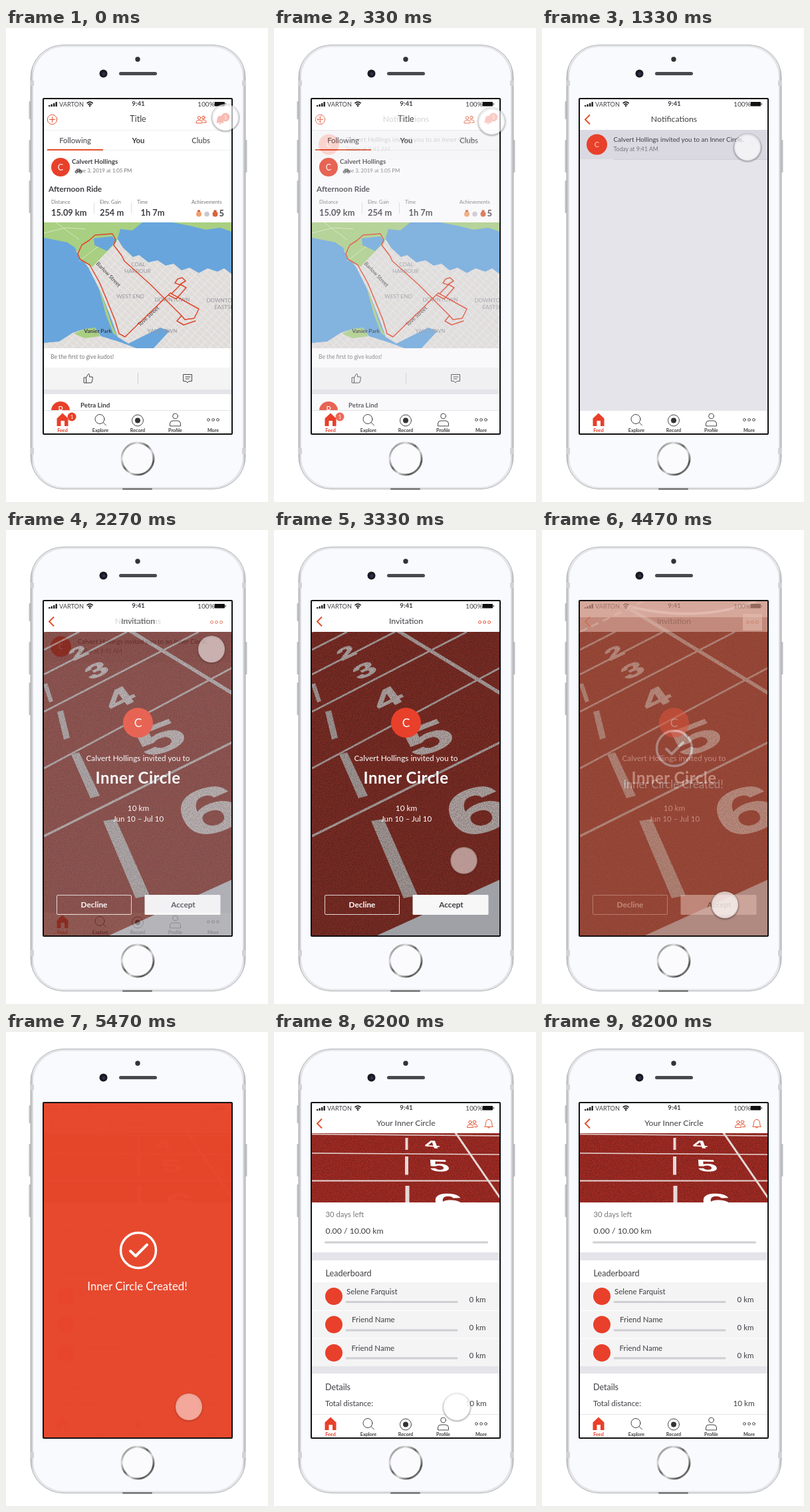
An HTML page that plays this animation: 394x712 px, repeating every 8.54 s.

```html
<!DOCTYPE html>
<html lang="en">
<head>
<meta charset="utf-8">
<title>Inner Circle prototype</title>
<style>
html, body { margin: 0; width: 100%; height: 100%; overflow: hidden; background: #fff; }
svg { display: block; }
text { font-family: Lato, "Open Sans", sans-serif; fill: #3f3f44; }
.m { text-anchor: middle; }
.e { text-anchor: end; }
.b { font-weight: 700; }
.w { fill: #fff; }
.g { fill: #77777c; }
.place { fill: #96969d; }
.r { fill: #e8402a; }
.line { fill: none; stroke: #444; stroke-width: 1; stroke-linecap: round; stroke-linejoin: round; }
.red { stroke: #e2512f; }
.paint { fill: none; stroke: #ab9f9d; }
.digit { font-family: "Liberation Sans", Arial, sans-serif; font-weight: 700; text-anchor: middle; }
.lane { fill: #b3a6a4; stroke: #b3a6a4; stroke-width: 1; }

.anim { animation: 8540ms linear infinite both; }
#notices { animation-name: toNotices; }
#invite { animation-name: toInvite; }
.leave { animation-name: leaveInvite; }
#created { animation-name: toCreated; }
#wash { animation-name: warm; }
#circle { animation-name: toCircle; }
#px { animation-name: moveX; }
#py { animation-name: moveY; }
#dot { animation-name: press; }
#shade { animation-name: lift; }

@keyframes toNotices { 0%, .82% { opacity: 0; animation-timing-function: ease-in-out; } 10.19%, 100% { opacity: 1; } }
@keyframes toInvite { 0%, 20.26% { opacity: 0; animation-timing-function: ease-in-out; } 29.63%, 100% { opacity: 1; } }
@keyframes leaveInvite { 0%, 48% { opacity: 1; animation-timing-function: ease-in-out; } 57.4%, 100% { opacity: 0; } }
@keyframes toCreated { 0%, 48% { opacity: 0; animation-timing-function: ease-in-out; } 57.4%, 100% { opacity: 1; } }
@keyframes warm { 0%, 52% { fill: #c46f54; } 57.4%, 100% { fill: #e7472b; } }
@keyframes toCircle { 0%, 63.23% { opacity: 0; animation-timing-function: ease-in-out; } 72.6%, 100% { opacity: 1; } }
@keyframes moveX {
  0%, 1.76% { transform: translateX(330px); animation-timing-function: ease-in-out; }
  10.19%, 31.26% { transform: translateX(309px); animation-timing-function: cubic-bezier(.42, 0, .8, 1); }
  42.15%, 81.4% { transform: translateX(275px); animation-timing-function: ease-in-out; }
  87.24%, 89% { transform: translateX(385px); animation-timing-function: ease-in; }
  91.4%, 100% { transform: translateX(396px); }
}
@keyframes moveY {
  0%, 1.76% { transform: translateY(134px); animation-timing-function: ease-in-out; }
  10.19%, 31.26% { transform: translateY(179px); animation-timing-function: ease-in-out; }
  42.15%, 81.4% { transform: translateY(563px); animation-timing-function: ease-in-out; }
  87.24%, 89% { transform: translateY(58px); animation-timing-function: ease-in; }
  91.4%, 100% { transform: translateY(-40px); }
}
@keyframes press {
  0%, 18% { fill-opacity: .65; }
  30%, 46% { fill-opacity: .52; }
  49%, 53% { fill-opacity: .7; }
  58%, 65% { fill-opacity: .52; }
  72.6%, 100% { fill-opacity: .88; }
}
@keyframes lift { 0%, 20% { opacity: .45; } 30%, 46% { opacity: .15; } 49%, 53% { opacity: .45; } 58%, 65% { opacity: .2; } 72.6%, 100% { opacity: .45; } }
</style>
</head>
<body>
<svg width="394" height="712" viewBox="0 0 394 712">
<defs>
  <clipPath id="screen"><rect x="57" y="107" width="283" height="502"/></clipPath>
  <clipPath id="mapBox"><rect x="57" y="292" width="283" height="189"/></clipPath>
  <clipPath id="banner"><rect x="57" y="152" width="283" height="104"/></clipPath>
  <linearGradient id="edge">
    <stop offset="0" stop-color="#b4b5b8"/><stop offset=".012" stop-color="#e4e5e8"/>
    <stop offset=".988" stop-color="#e4e5e8"/><stop offset="1" stop-color="#b4b5b8"/>
  </linearGradient>
  <linearGradient id="ring" x2="1" y2="1">
    <stop offset="0" stop-color="#555"/><stop offset=".25" stop-color="#ddd"/><stop offset=".45" stop-color="#666"/>
    <stop offset=".6" stop-color="#ddd"/><stop offset=".8" stop-color="#555"/><stop offset="1" stop-color="#bbb"/>
  </linearGradient>
  <pattern id="blocks" width="10" height="7" patternUnits="userSpaceOnUse" patternTransform="rotate(43)">
    <rect width="10" height="7" fill="#dfdcda"/><path d="M0 0H10M0 0V7" stroke="#efedeb" stroke-width="1.6"/>
  </pattern>
  <filter id="grain" x="0" y="0" width="1" height="1">
    <feTurbulence type="fractalNoise" baseFrequency=".8" numOctaves="2" seed="4"/>
    <feColorMatrix values="0 0 0 0 0  0 0 0 0 0  0 0 0 0 0  0 0 0 .8 -.3"/>
  </filter>
  <filter id="soft" x="-20%" y="-20%" width="140%" height="140%"><feGaussianBlur stdDeviation="1"/></filter>

  <g id="status">
    <path d="M64 116h2.4v2H64zM67.5 114.5h2.4v3.5h-2.4zM71 113h2.4v5H71zM74.5 111h2.4v7h-2.4z" fill="#222"/>
    <text x="80" y="118" font-size="9.2">VARTON</text>
    <path d="M121.5 113.2Q126 109.2 130.7 113.2M123.4 115.3Q126 112.9 128.8 115.3" fill="none" stroke="#222" stroke-width="1.6"/>
    <circle cx="126.1" cy="117" r="1.3" fill="#222"/>
    <text class="m b" x="199" y="117.3" font-size="9.8">9:41</text>
    <text x="288" y="117.8" font-size="10.2">100%</text>
    <rect x="313.5" y="111" width="15.5" height="6.6" rx="1" fill="#111"/><rect x="329.6" y="113" width="1.4" height="2.6" fill="#555"/>
  </g>
  <path id="back" d="M72 130.500L65 137.500L72 144.500" fill="none" stroke="#e2512f" stroke-width="2"/>
  <g id="friends" class="line red">
    <circle cx="-3" cy="-2.500" r="2.200"/><circle cx="3.500" cy="-3" r="2.200"/>
    <path d="M-7.500 5V3.500Q-7 1-3 1T1.500 3.500V5ZM1.500 .7Q7.500 0 7.500 3V4.500H3.500"/>
  </g>
  <path id="bell" d="M-6 4.500Q-4.500 3-4.500-1Q-4-6 0-6T4.500-1Q4.500 3 6 4.500ZM-2 5Q0 8.500 2 5"/>
  <g id="tabs">
    <rect x="57" y="575" width="283" height="34" fill="#fff"/><path d="M57 574.500H340" stroke="#e4e4e8"/>
    <path d="M76.500 586.500L85 578.500L93.500 586.500V598H88V590H82.500V598H76.500Z" class="r"/>
    <g class="line">
      <circle cx="141" cy="587.500" r="7"/><path d="M146 592.500L150.500 597"/>
      <circle cx="198" cy="589.500" r="8.500"/>
      <circle cx="254.500" cy="583" r="3.800"/><path d="M246.500 597.500V594Q247 590 251 590H258Q262 590 262.500 594V597.500Z"/>
      <circle cx="304.500" cy="588.500" r="1.900"/><circle cx="311.500" cy="588.500" r="1.900"/><circle cx="318.500" cy="588.500" r="1.900"/>
    </g>
    <circle cx="198" cy="589.500" r="4" fill="#333"/>
    <g class="m b" font-size="7.200">
      <text x="85" y="607" class="r">Feed</text><text x="142" y="607">Explore</text><text x="198" y="606.500">Record</text>
      <text x="254.500" y="607">Profile</text><text x="311.500" y="607">More</text>
    </g>
  </g>
</defs>

<!-- phone -->
<g fill="#c0c1c4">
  <rect x="34.500" y="110" width="4" height="27" rx="1"/><rect x="34.500" y="168" width="4" height="49" rx="1"/>
  <rect x="34.500" y="229" width="4" height="49" rx="1"/><rect x="358.500" y="168" width="4" height="49" rx="1"/>
</g>
<rect x="37" y="25.500" width="323" height="667" rx="49" fill="url(#edge)" stroke="#b4b5b8"/>
<rect x="41" y="28.500" width="315" height="661" rx="46" fill="#f9fafe"/>
<path d="M37 79h5v8h-5zM355 79h5v8h-5zM37 631h5v9h-5zM355 631h5v9h-5z" fill="#d2d3d6"/>
<rect x="175" y="691.500" width="45" height="2" rx="1" fill="#555"/>
<circle cx="198" cy="47" r="3.700" fill="#333"/>
<circle cx="146.500" cy="68.500" r="6" fill="#191a20"/><circle cx="147" cy="69" r="2.400" fill="#2c3050"/>
<rect x="170" y="66" width="57" height="5" rx="2.500" fill="#48494c"/>
<circle cx="198" cy="647" r="24" fill="#fbfbfd" stroke="url(#ring)" stroke-width="3"/>

<g clip-path="url(#screen)">
<g id="feed">
  <rect x="57" y="107" width="283" height="502" fill="#fff"/>
  <use href="#status"/>
  <text class="m" x="198.500" y="141" font-size="12.500">Title</text>
  <g class="line red"><circle cx="69.500" cy="137.500" r="7.200"/><path d="M65.500 137.500H73.500M69.500 133.500V141.500"/></g>
  <use href="#friends" x="293.500" y="137.500"/>
  <use href="#bell" x="322" y="138" fill="#e8402a"/>
  <circle cx="330" cy="134" r="6.500" class="r"/><text class="m w" x="330" y="137" font-size="8">1</text>
  <path d="M57 153.500H340M57 183.500H340" stroke="#eeeef1"/>
  <g class="m" font-size="11.300">
    <text x="104" y="173">Following</text><text x="199" y="173" class="b">You</text><text x="293" y="173">Clubs</text>
  </g>
  <rect x="62" y="182" width="84" height="2" fill="#e2512f"/>
  <circle cx="82" cy="209" r="14" class="r"/><text class="m w" x="82" y="213.500" font-size="12.500">C</text>
  <text class="b" x="99" y="204" font-size="9.800">Calvert Hollings</text>
  <text class="g" x="104" y="217" font-size="7.900">June 3, 2019 at 1:05 PM</text>
  <g class="line" stroke-width=".8"><circle cx="106" cy="216" r="2"/><circle cx="112" cy="216" r="2"/><path d="M106 216L108 212H111L112 216M108 212L110 216L111 212"/></g>
  <text class="b" x="64" y="245.500" font-size="11.800">Afternoon Ride</text>
  <g font-size="7.400">
    <text class="g" x="68" y="264">Distance</text><text class="g" x="141" y="264">Elev. Gain</text>
    <text class="g" x="197" y="264">Time</text><text class="g" x="279" y="264">Achievements</text>
  </g>
  <g class="b" font-size="12.800">
    <text x="68" y="282">15.09 km</text><text x="141" y="282">254 m</text><text x="202.500" y="282">1h 7m</text><text x="320.500" y="283">5</text>
  </g>
  <path d="M132.500 262V279M188.500 262V279" stroke="#ddd"/>
  <circle cx="290" cy="279.500" r="4" fill="#f0a06c"/><circle cx="302" cy="279.500" r="3.800" fill="#c9c9cf"/><circle cx="314.500" cy="279.500" r="4" fill="#d9643c"/>
  <path d="M288 273.500h4v2.500h-4zM312.500 273.500h4v2.500h-4z" fill="#d65b3a"/>

  <g clip-path="url(#mapBox)">
    <rect x="57" y="292" width="283" height="189" fill="#68a5dc"/>
    <path d="M105 335L165 313L176 330L191 344L200 341L214 352L228 349L240 357L252 354L264 364L276 360L290 368L303 361L318 366L328 361L340 370V481H222L246 455L232 450L184 474L168 464L158 436L143 398L124 360Z" fill="url(#blocks)"/>
    <path d="M57 473L80 471L100 458L118 452L134 451L143 463L172 472L196 481H57Z" fill="url(#blocks)"/>
    <path d="M57 292H205L190 304L172 302L166 322L146 342L130 359L112 349L104 330L92 322L57 315Z" fill="#a9cf82"/>
    <path d="M57 308L90 300L120 302M75 292L110 318M110 350L136 330L165 320" fill="none" stroke="#d6e6bd"/>
    <path d="M102 459L118 452L134 450L142 463L118 466ZM138 385L150 418L160 448L168 464L161 458L150 430Z" fill="#a9cf82"/>
    <path d="M132 316L160 313L166 320L152 335L133 326Z" fill="#68a5dc"/>
    <path d="M250 292H340V306L322 300L300 303L276 297Z" fill="#a9cf82"/>
    <g class="m" font-size="8.200">
      <text class="place" x="199" y="358">COAL</text><text class="place" x="198" y="368">HARBOUR</text><text class="place" x="187" y="406">WEST END</text>
      <text class="place" x="250" y="411">DOWNTOWN</text><text class="place" x="235" y="458">YALETOWN</text>
      <text class="place" x="328" y="412">DOWNTOWN</text><text class="place" x="332" y="422">EASTSIDE</text>
      <text class="b" x="138" y="458">Vanier Park</text>
      <text transform="translate(152 372) rotate(46)">Barlow Street</text>
      <text transform="translate(216 435) rotate(-43)">Tove Street</text>
    </g>
    <path class="line" style="stroke:#e0452b;stroke-width:1.500" d="M108 339L114 326L125 319L134 311L160 309L165 318L162 326L174 342L178 350L197 367L218 386L242 410L264 432L269 438L283 436L290 422L270 411L247 398L179 464L170 459L164 439L151 407L141 383L126 356L111 347ZM264 432L257 440L267 446L285 440M232 412L244 401L256 407L271 390L262 385L270 380L265 375L258 377L254 383L262 386L249 399"/>
  </g>

  <text class="g" x="67" y="497" font-size="8.500">Be the first to give kudos!</text>
  <rect x="57" y="510" width="283" height="33" fill="#f4f4f5"/><path d="M198.500 518V534" stroke="#ccc"/>
  <g class="line">
    <path d="M117.500 525H120.500V533H117.500ZM120.500 525L124 519.500Q126 519 125.500 524H130Q131 525 129 532.500L127 533H120.500"/>
    <path d="M267 520.500H279.500V530.500H275L273 533L271 530.500H267ZM270 524H277M270 527H275"/>
  </g>
  <rect x="57" y="543" width="283" height="7" fill="#e5e4ea"/>
  <circle cx="82" cy="575" r="14" class="r"/><text class="m w" x="82" y="577.500" font-size="12.500">P</text>
  <text class="b" x="112" y="569.500" font-size="9.800">Petra Lind</text>
  <use href="#tabs"/>
  <circle cx="99" cy="584" r="6.500" class="r"/><text class="m w" x="99" y="587" font-size="8">1</text>
</g>

<g id="notices" class="anim">
  <rect x="57" y="107" width="283" height="502" fill="#e5e4ea"/>
  <rect x="57" y="107" width="283" height="46" fill="#fff"/>
  <use href="#status"/><use href="#back"/>
  <text class="m" x="198.500" y="141" font-size="12.300">Notifications</text>
  <rect x="57" y="153" width="283" height="44" fill="#dad9e1"/><path d="M107 197.500H340" stroke="#d0cfd8"/>
  <circle cx="82.500" cy="175" r="15.500" class="r"/><text class="m" x="82.500" y="179" font-size="11" style="fill:#ffd2b8">C</text>
  <text x="107.500" y="171" font-size="9.800">Calvert Hollings invited you to an Inner Circle.</text>
  <text class="g" x="107.500" y="185" font-size="8.700">Today at 9:41 AM</text>
  <path class="line" style="stroke:#c4c3cc" d="M314 171L318 175L314 179"/>
  <use href="#tabs"/>
</g>

<g id="invite" class="anim">
  <rect x="57" y="107" width="283" height="502" fill="#7b2d25"/>
  <g class="paint">
    <path d="M57 180L110 153M57 217L182 153M57 273L290 153M57 358L340 207" stroke-width="2.600"/>
    <path d="M57 460L340 319" stroke-width="3.500"/>
    <path d="M120 111L340 245" stroke-width="5.500"/>
    <path d="M120 112Q230 142 322 107" stroke-width="4" stroke="#eee"/>
    <path d="M57 153L155 106" stroke-width="3" stroke-dasharray="12 7"/>
  </g>
  <path d="M56 232L62 230L71 257L65 259ZM77 273L86 271L96 312L87 315ZM98 337L110 334L141 399L127 403ZM146 437L165 434L216 549L195 553Z" fill="#a59a98"/>
  <g class="digit lane">
    <text class="digit lane" transform="matrix(1.6 -.75 .55 .7 114 191)" font-size="28">2</text>
    <text class="digit lane" transform="matrix(1.7 -.8 .55 .75 142 219)" font-size="32">3</text>
    <text class="digit lane" transform="matrix(1.65 -.8 .6 .8 179 264)" font-size="41">4</text>
    <text class="digit lane" transform="matrix(1.95 -.75 .6 .88 244 331)" font-size="61">5</text>
    <text class="digit lane" transform="matrix(1.8 -.6 .5 1 321 452)" font-size="88">6</text>
  </g>
  <rect x="57" y="107" width="283" height="502" filter="url(#grain)"/>
  <path d="M155 609L340 525V609Z" fill="#a0a1a6"/>
  <rect class="anim leave" x="57" y="107" width="283" height="46" fill="#fff"/>
  <rect class="anim leave" x="57" y="107" width="283" height="24" fill="#fff"/>
  <rect class="anim leave" x="302" y="126" width="29" height="25" fill="#fff"/>
  <g class="anim leave">
    <use href="#status"/><use href="#back"/>
    <text class="m" x="198.500" y="141" font-size="12.300">Invitation</text>
    <g class="line red" stroke-width="1.200"><circle cx="309.500" cy="138.500" r="2"/><circle cx="316.500" cy="138.500" r="2"/><circle cx="323.500" cy="138.500" r="2"/></g>
    <circle cx="198.500" cy="289.500" r="22.500" class="r"/>
    <g class="m">
      <text class="w" x="198.500" y="295.500" font-size="17.500">C</text>
      <text class="w" x="198.500" y="347" font-size="11.800">Calvert Hollings invited you to</text>
      <text class="w b" x="198.500" y="381" font-size="24" letter-spacing=".5">Inner Circle</text>
      <text class="w" x="199" y="421.500" font-size="11.800">10 km</text>
      <text class="w" x="199" y="438" font-size="11.500">Jun 10 – Jul 10</text>
      <rect x="76.500" y="548.500" width="112" height="29" rx="1.500" fill="none" stroke="#fff" stroke-opacity=".8"/>
      <rect x="208.500" y="548" width="114" height="30" rx="1.500" fill="#f7f7f8"/>
      <text class="w b" x="132.500" y="567" font-size="11.800">Decline</text>
      <text class="b" x="266.500" y="567" font-size="11.800">Accept</text>
    </g>
  </g>
</g>

<g id="created" class="anim">
  <rect id="wash" class="anim" x="57" y="107" width="283" height="502" fill="#e7472b"/>
  <circle cx="199" cy="328" r="26.500" fill="none" stroke="#fff" stroke-width="3.500"/>
  <path d="M187 329L195 336.500L212 319.500" fill="none" stroke="#fff" stroke-width="4" stroke-linecap="round" stroke-linejoin="round"/>
  <text class="m w" x="197.500" y="387.500" font-size="16.700">Inner Circle Created!</text>
</g>

<g id="circle" class="anim">
  <rect x="57" y="107" width="283" height="502" fill="#fff"/>
  <use href="#status"/><use href="#back"/>
  <text class="m" x="198.500" y="140.500" font-size="12.200">Your Inner Circle</text>
  <use href="#friends" x="298" y="138"/>
  <use href="#bell" x="323" y="137.500" class="line red"/>
  <g clip-path="url(#banner)">
    <rect x="57" y="152" width="283" height="104" fill="#a52c25"/>
    <rect x="57" y="152" width="283" height="104" filter="url(#grain)"/>
    <g fill="none" stroke="#e6d8d5">
      <path d="M57 153.500L340 156M57 182L340 184" stroke-width="1.600"/><path d="M57 223.500H340" stroke-width="2.200"/>
      <path d="M272 150L342 252" stroke-width="3"/>
      <path d="M199.500 159V177" stroke-width="4"/><path d="M199.500 187V214.500" stroke-width="5"/><path d="M200.500 231V258" stroke-width="6"/>
    </g>
    <text class="digit w" transform="matrix(1.9 .1 .3 .8 239 174.500)" font-size="21">4</text>
    <text class="digit w" transform="matrix(2 .05 .2 .9 250 209.500)" font-size="28">5</text>
    <text class="digit w" transform="matrix(2 .05 .2 .9 266 269)" font-size="42">6</text>
  </g>
  <text class="g" x="77.500" y="278" font-size="11.300">30 days left</text>
  <text x="77.500" y="303" font-size="12.300">0.00 / 10.00 km</text>
  <path d="M57 331H340V343H57ZM57 502H340V513H57Z" fill="#e5e4ea"/>
  <rect x="57" y="376" width="283" height="126" fill="#f4f4f5"/>
  <path d="M57 418.500H340M57 460.500H340" stroke="#fff"/>
  <path d="M77.500 316H320.500M109 405.500H275M109 448H275M109 490H275" stroke="#cfcfd3" stroke-width="3" stroke-linecap="round"/>
  <g class="r"><circle cx="90" cy="397" r="13"/><circle cx="90" cy="439.500" r="13"/><circle cx="90" cy="482" r="13"/></g>
  <text x="77.500" y="367" font-size="12.600">Leaderboard</text>
  <g font-size="11.500">
    <text x="109" y="393.500">Selene Farquist</text><text x="117" y="436">Friend Name</text><text x="116.500" y="478.500">Friend Name</text>
    <g class="e"><text x="318.500" y="405.500">0 km</text><text x="318.500" y="448">0 km</text><text x="318.500" y="490">0 km</text></g>
  </g>
  <text x="77" y="538" font-size="12.500">Details</text>
  <text x="77" y="562" font-size="11.500">Total distance:</text><text class="e" x="319.500" y="562" font-size="11.700">10 km</text>
  <use href="#tabs"/>
</g>
</g>
<rect x="56" y="106" width="284" height="504" rx="1" fill="none" stroke="#111" stroke-width="2"/>

<g id="px" class="anim"><g id="py" class="anim">
  <circle id="shade" class="anim" cy="1" r="20" fill="none" stroke="#000" stroke-width="1.600" filter="url(#soft)"/>
  <circle id="dot" class="anim" r="20" fill="#fff"/>
</g></g>
</svg>
</body>
</html>
```
